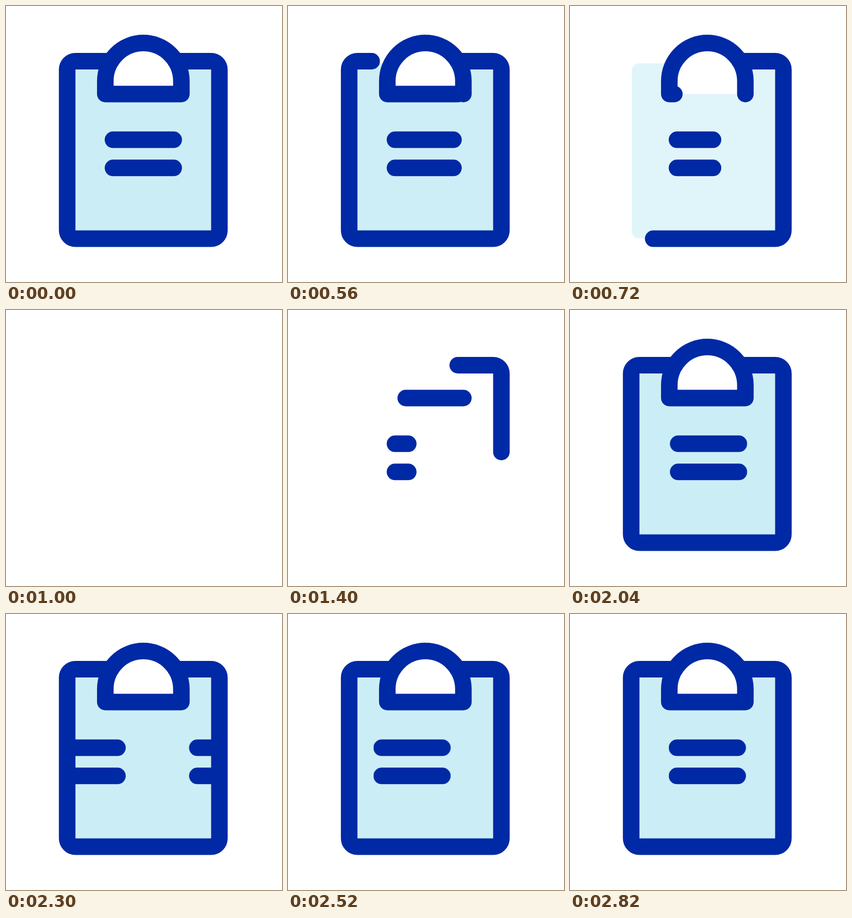
An HTML page for the animation above (3 s loop, 500 by 500 pixels).

```html
<!DOCTYPE html>
<html lang="en">
<head>
<meta charset="utf-8">
<title>Clipboard</title>
<style>
  html, body { margin: 0; width: 100%; height: 100%; overflow: hidden; background: #fff; }
  svg { display: block; width: 100vw; height: 100vh; }
  .ink { fill: none; stroke: #0029a5; stroke-width: 30; stroke-linecap: round; stroke-linejoin: round; }
  .trim { stroke-dasharray: 1 2; }
</style>
</head>
<body>
<svg viewBox="0 0 500 500">
  <defs>
    <clipPath id="inside"><rect x="111" y="104" width="275" height="317"/></clipPath>
  </defs>

  <g id="paper">
    <rect x="112" y="104" width="274" height="317" rx="13" fill="#cbeef6"/>
    <path d="M317.7 159.5H179.9V136a68.9 68.9 0 0 1 137.8 0z" fill="#fff"/>
  </g>

  <g class="ink">
    <g clip-path="url(#inside)">
      <g id="slider">
        <path class="trim line" pathLength="1" d="M193.8 242.3H303.8"/>
        <path class="trim line" pathLength="1" d="M193.8 293.3H303.8"/>
        <path d="M-60.9 242.3h110M-60.9 293.3h110"/>
      </g>
    </g>
    <path id="board" class="trim" pathLength="1"
      d="M307.5 100H371.6a15 15 0 0 1 15 15V406.6a15 15 0 0 1 -15 15H125.8a15 15 0 0 1 -15 -15V115a15 15 0 0 1 15 -15H190"/>
    <path id="clip" class="trim" pathLength="1"
      d="M317.7 159.5H179.9V136a68.9 68.9 0 0 1 137.8 0V159.5"/>
  </g>
</svg>
<script>
  const LOOP = 3000;
  const SMOOTH = 'cubic-bezier(.333,0,.667,1)';
  const SOFT = 'cubic-bezier(.333,.167,.667,.833)';
  const LATE = 'cubic-bezier(.43,0,.73,1)';
  const SETTLE = 'cubic-bezier(.33,0,.18,1)';
  const HOLD = 'step-end';

  // Each step is [time in ms, value, easing towards the next step].
  function play(el, prop, steps) {
    const frames = steps.map(([ms, value, easing = 'linear']) =>
      ({ offset: ms / LOOP, [prop]: value, easing }));
    el.animate(frames, { duration: LOOP, iterations: Infinity });
  }

  // Erase the stroke, keep it hidden, then draw it again from its start.
  function trim(el, gone, easeOut, easeIn) {
    play(el, 'strokeDashoffset', [
      [0, 0], [504, 0, easeOut], [1000, gone, HOLD],
      [1250, 1, easeIn], [1750, 0], [LOOP, 0]
    ]);
    play(el, 'visibility', [
      [0, 'visible', HOLD], [998, 'hidden', HOLD],
      [1252, 'visible', HOLD], [LOOP, 'visible']
    ]);
  }

  const $ = id => document.getElementById(id);

  document.querySelectorAll('.line').forEach(el => trim(el, 1, SMOOTH, SMOOTH));
  trim($('board'), 1, SMOOTH, SMOOTH);
  trim($('clip'), -1, LATE, SOFT);

  play($('paper'), 'opacity', [
    [0, 1], [500, 1, SMOOTH], [1000, 0],
    [1400, 0, SMOOTH], [1750, 1], [LOOP, 1]
  ]);

  play($('slider'), 'transform', [
    [0, 'translateX(0px)'], [2000, 'translateX(0px)', SETTLE],
    [2830, 'translateX(254.7px)'], [LOOP, 'translateX(254.7px)']
  ]);
</script>
</body>
</html>
```
